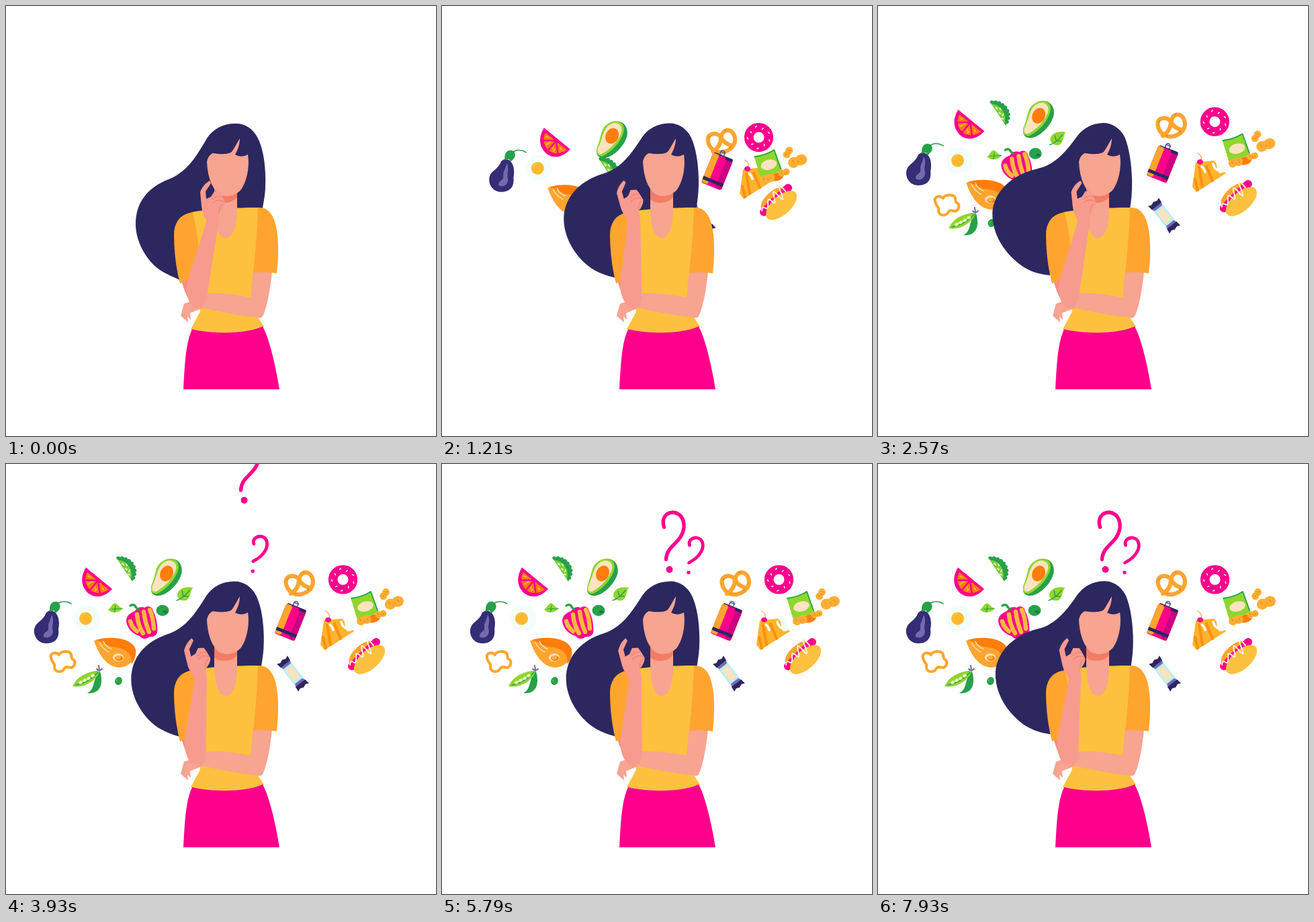
Animation of 640x640 px, one loop 8000 ms. Source, as an HTML page:

```html
<!DOCTYPE html>
<html lang="en">
<head>
<meta charset="utf-8">
<title>Food choices</title>
<style>
html, body { margin: 0; width: 100%; height: 100%; overflow: hidden; background: #fff; }
svg { display: block; width: 100%; height: 100%; }
</style>
</head>
<body>
<svg id="stage" viewBox="0 0 640 640"></svg>
<script>
const PINK = '#ff008c', NAVY = '#2d2760', PURPLE = '#7569b0', ORANGE = '#ffa52f', DEEP = '#ff7d0b',
  YELLOW = '#fcc13f', GREEN = '#27a14a', LIME = '#8fd62f', CREAM = '#fde3c0', WHITE = '#fff',
  SKIN = '#f7a491', ARM = '#f79b8e', SHADE = '#f27c66';

const shape = (fill, d) => `<path fill="${fill}" d="${d}"/>`;
const line = (color, width, d, extra = '') =>
  `<path fill="none" stroke="${color}" stroke-width="${width}" stroke-linecap="round" stroke-linejoin="round" d="${d}" ${extra}/>`;
const oval = (fill, x, y, rx, ry = rx, turn = 0) =>
  `<ellipse fill="${fill}" cx="${x}" cy="${y}" rx="${rx}" ry="${ry}" transform="rotate(${turn} ${x} ${y})"/>`;
const box = (fill, x, y, w, h, r = 0) =>
  `<rect fill="${fill}" x="${x}" y="${y}" width="${w}" height="${h}" rx="${r}"/>`;
const turned = (x, y, angle, content) => `<g transform="translate(${x} ${y}) rotate(${angle})">${content}</g>`;
const repeat = (n, f) => Array.from({ length: n }, (_, i) => f(i)).join('');

// Two overlapping lobes with small dents
const nut = (x, y, rx, ry, turn) => turned(x, y, turn,
  oval('#ffae35', -rx * .42, 0, rx * .58, ry) + oval('#ffae35', rx * .38, -1, rx * .62, ry) +
  line('#ee8a1c', 1.2, `M${-rx * .5} ${-ry * .4}l1 3M0 ${-ry * .1}l1 3M${rx * .4} ${-ry * .4}l1 3`));

// Each food: resting centre, start of its flight in ms, drawing at rest
const foods = [
  { x: 62, y: 236, start: 105, art:
    shape('#352d75', 'M65 218C77 218 81 232 78 246C80 261 71 267 60 267C48 267 41 257 42 247C44 234 54 236 60 221Z') +
    shape(PURPLE, 'M68 224C73 234 67 241 70 248C70 257 62 261 56 257C55 249 64 251 63 243C62 237 67 232 68 224') +
    shape(GREEN, 'M65 214C66 206 72 203 78 206C82 210 81 215 78 218L74 222L71 218L65 220Z') +
    line(GREEN, 1.6, 'M78 207Q87 202 97 208') },
  { x: 135, y: 177, start: 319, art:
    shape(PINK, 'M119 154L158 186C147 199 130 201 120 190C111 180 111 167 119 154Z') +
    shape(DEEP, 'M121 161L153 187C143 194 131 194 124 186C117 178 117 169 121 161Z') +
    line(PINK, 2.5, 'M137 173L116 173M137 173L124 189M137 173L140 196') +
    line(YELLOW, 1.5, 'M122 167l3 1M122 179l4-2M132 186l1-3M133 189l2-3M145 187l-2-3M127 176l2-1') },
  { x: 119, y: 230, start: 142, art:
    shape('#f3fdfc', 'M104 222C104 211 115 209 122 211C132 208 140 218 139 228C144 239 133 249 124 247C113 252 103 245 103 237C99 232 100 226 104 222Z') +
    oval('#fcb92f', 118.5, 230, 9.5) + line('#fcc955', 1.5, 'M112 228Q114 223 118 223') },
  { x: 162, y: 280, start: 296, art:
    shape(ORANGE, 'M131 263C150 257 185 258 193 277C195 292 180 303 168 303C150 302 138 284 131 263Z') +
    shape(DEEP, 'M133 262C152 256 187 257 193 276C194 284 192 292 186 298C190 284 178 274 164 273C150 272 145 264 133 262Z') +
    line(CREAM, 1.4, 'M145 264Q148 272 157 275M139 266Q144 275 153 280') +
    oval(CREAM, 167, 288, 8, 6) + oval(DEEP, 168, 289, 6, 4) + oval('#ffb24a', 167, 288, 4, 3) },
  { x: 84, y: 294, start: 1320, art:
    line(ORANGE, 4.1, 'M67 289C65 281 74 279 79 284C80 278 96 277 97 284C98 289 97 290 100 291C104 293 103 303 96 303C91 303 90 300 87 304C84 311 72 311 72 302C74 297 69 297 67 289Z') },
  { x: 121, y: 322, start: 1003, art:
    shape(GREEN, 'M139 306C145 322 144 343 121 341C133 335 128 324 139 306Z') +
    shape(LIME, 'M99 331C106 315 122 309 140 307C136 321 118 334 99 331Z') +
    line(GREEN, 1.5, 'M104 329Q124 325 137 310') +
    [[111, 325], [117, 322], [123, 319], [129, 315]].map(p => oval('#f1f6c0', ...p, 3, 2.3, -25)).join('') +
    line(PURPLE, 2, 'M139 307L138 300M135 305Q139 309 143 305') },
  { x: 167, y: 323, start: 680, art: oval(GREEN, 167.5, 323, 5.3, 6, 20) + line(LIME, 1, 'M165 323l1-2') },
  { x: 179, y: 156, start: 835, art:
    shape(GREEN, 'M164 139C181 136 196 149 192 165L188 175Z') +
    line(GREEN, 5, 'M167 140C180 138 191 148 192 159C192 166 190 170 188 172', 'stroke-dasharray=".1 5.6"') +
    shape('#7ecf35', 'M167 143C178 143 190 155 186 172Z') +
    line('#e8f6c4', 2, 'M173 148l2 2M179 149l1 2M178 156l2 1M184 158l-1 2M182 164l2 1') },
  { x: 239, y: 169, start: 344, art:
    shape(GREEN, 'M247 141C259 142 265 154 260 167C253 184 236 197 225 196C216 195 214 188 218 178C222 169 222 154 230 147Z') +
    shape(LIME, 'M247 141C256 143 259 150 255 161C249 176 236 188 225 193C217 194 214 188 217 179C222 169 222 154 230 147C236 142 241 140 247 141Z') +
    shape(CREAM, 'M246 144C253 146 255 152 252 160C246 173 235 184 223 190C217 191 216 185 219 179C224 169 225 156 232 149C236 145 241 143 246 144Z') +
    oval(DEEP, 239, 163, 9.5, 12, 25) },
  { x: 202, y: 235, start: 1074, art:
    shape(PINK, 'M179 234C179 225 186 221 192 219C195 213 203 212 206 214C211 210 218 212 219 219C225 230 226 244 225 251C222 258 217 257 214 257C208 262 201 260 199 256C190 254 180 245 179 234Z') +
    line('#fdb83e', 6.5, 'M185 234Q187 243 195 249M195 224Q196 239 204 252M205 220Q207 236 213 250M214 217Q219 228 220 245') +
    line(GREEN, 3.4, 'M197 216Q193 214 192 211Q189 208 185 211') },
  { x: 233, y: 218, start: 800, art: oval(GREEN, 233, 218, 9.5, 8.3) + oval('#157a3b', 237, 220, 3, 2) },
  { x: 265, y: 193, start: 982, art:
    shape(LIME, 'M278 184C265 181 255 187 255 196C257 203 266 205 270 202C275 197 274 190 278 184Z') +
    line(GREEN, 1.4, 'M254 203Q264 200 273 188M264 197l-2-8M264 197l7 0') },
  { x: 163, y: 215, start: 1272, art:
    shape(LIME, 'M152 217C157 213 157 208 163 207C167 210 169 214 174 215C167 222 159 223 152 217Z') +
    line(GREEN, 1.2, 'M157 216L173 215M162 216l1-5M163 216l-2 4') },
  { x: 437, y: 178, start: 257, art: turned(437, 178, -8,
    line(ORANGE, 6.2, 'M0 -6C-4 -15 -20 -16 -20 -4C-20 8 -12 16 0 16C13 15 22 6 20 -5C18 -18 4 -19 0 -6C-2 5 -8 10 -15 13M0 -6C3 3 10 7 16 9') +
    line('#d97a12', 1.2, 'M-18 -8l2-2M7 -15l2-1M-10 13l2 1M10 12l2-2')) },
  { x: 501, y: 172, start: 240, art:
    `<circle cx="501.5" cy="172" r="14.8" fill="none" stroke="${PINK}" stroke-width="13.6"/>` +
    repeat(9, i => turned(501.5, 172, i * 40 + 12, line(WHITE, 1.5, i % 2 ? 'M13 0l2 1' : 'M16 0l1 2'))) },
  { x: 423, y: 235, start: 135, art: turned(423, 235, 22,
    line('#55508c', 1.5, 'M-5 -25C-8 -34 3 -34 1 -25M-5 -29H2') +
    box(NAVY, -14, -25, 30, 10, 2) + box(PINK, -15.5, -23.5, 32, 48, 3) +
    box(ORANGE, -15.5, -23.5, 10, 47, 3) + box('#cc0082', 7, -22, 9.5, 46, 3) +
    box(NAVY, -15.5, 14, 32, 5) + box(NAVY, 5, -24.5, 11, 4, 1)) },
  { x: 490, y: 248, start: 186, art:
    shape('#ffb32e', 'M473 233L500 230L518 249L474 277L468 269Z') +
    line('#ff900f', 4, 'M478 240L483 269M489 238L498 260M472 258L476 274') +
    line(WHITE, 3.5, 'M482 239Q485 241 487 247M499 235Q501 242 505 244') +
    shape('#f3fdfc', 'M503 229Q517 232 517 246Q508 252 506 246Q504 238 503 229Z') +
    line(DEEP, 1, 'M481 230Q483 222 476 219') + oval(PINK, 479.5, 232, 4.6, 3.7) },
  { x: 537, y: 286, start: 243, art:
    oval(ORANGE, 530, 281, 24, 11, -41) +
    line(PINK, 12, 'M515 301L551 265') +
    oval(YELLOW, 541, 291, 28.5, 14, -42) +
    line('#fff0e0', 2, 'M512 299Q512 292 517 295T521 288T527 285T530 278T537 277T540 271T547 270') },
  { x: 534, y: 210, start: 385, art:
    shape(LIME, 'M513 199Q530 198 543 189L555 221L523 232Z') +
    line(GREEN, 1.8, 'M514 200Q530 198 543 190L553 218') +
    oval(CREAM, 535, 212, 12, 7.5, -14) +
    oval(DEEP, 547, 230, 10, 6, -15) + nut(533, 233, 11, 6.5, -8) + nut(558, 224, 8.5, 5, -8) +
    nut(564, 194, 9, 5.5, -50) + nut(578, 207, 14.5, 8, -15) },
  { x: 427, y: 312, start: 645, art: turned(427, 312, 52,
    box('#b4eff4', -18, -8.5, 36, 17) + box(CREAM, -11, -6, 22, 12, 1) +
    [0, 180].map(a => turned(0, 0, a, shape(PURPLE, 'M-14 -7L-19 -9V9L-14 7Z') +
      shape(NAVY, 'M-18 -9L-26 -10L-24 -5L-26 0L-24 5L-26 10L-18 9Z'))).join('')) }
];

const hairRight = 'M382 301C384 288 386 279 386 268C387 243 384 215 375 197C368 182 354 174 341 175C323 175 308 183 299 197C283 224 270 247 242 258C211 270 193 292 193 325C193 352 211 383 234 396C243 401 252 405 262 409L280 420L312 330Z';
const hairLeft = 'M375 301C377 290 378 277 378 264C378 243 375 214 367 195C360 181 347 174 335 174C317 175 306 182 297 193C282 213 266 236 237 242C200 250 170 277 170 310C170 345 195 376 221 391C232 397 244 400 260 401L280 420L312 330Z';

const woman =
  `<path id="hair" fill="${NAVY}"/>` +
  shape(YELLOW, 'M276 307C300 302 340 300 377 300L392 350L368 432L374 462L384 477C355 490 305 489 275 481L289 455L284 400Z') +
  shape(SKIN, 'M310 265V300C311 330 316 345 327 345C339 345 344 325 344 300V265Z') +
  shape(SHADE, 'M310 270V288C320 296 337 294 344 284V265Z') +
  shape(SKIN, 'M299 232C300 226 303 221 308 219C318 221 331 221 336 217C341 210 344 203 348 197C348 207 344 216 341 221C347 225 355 224 360 221C363 240 358 262 350 273C340 285 325 285 316 279C304 268 300 250 299 232Z') +
  shape(PINK, 'M277 481C305 488 355 489 382 477C393 497 402 540 407 570.5H264C266 530 268 500 277 481Z') +
  shape(SKIN, 'M368 394L396 395C393 425 388 450 382 462C380 465 375 464 370 463C345 460 315 455 288 448L296 428C325 427 345 430 364 434Z') +
  shape(ORANGE, 'M375 300C393 299 401 315 404 340C406 360 405 380 403 398C392 396 380 396 368 397C372 360 374 330 375 300Z') +
  shape(SKIN, 'M277 439L265 443L260 461L271 471L270 462L275 467L274 457L294 449Z') +
  shape('#f48e7f', 'M261 408L278 402L286 440L280 447C272 440 265 424 261 408Z') +
  shape(ORANGE, 'M278 307C260 309 250 322 250 340C250 365 253 390 259 413L271 407C280 385 287 368 286 352C284 335 281 320 278 307Z') +
  '<g id="forearm">' +
  shape(ARM, 'M299 317C292 344 281 374 271 406C267 422 269 436 276 445C281 452 290 452 295 444C299 436 299 430 301 420L317 318Z') +
  shape(ARM, 'M303 260C296 264 291 271 289 277L291 298C292 308 296 314 299 321L316 324L317 308C322 304 326 298 326 293L322 283L319 277L310 276L305 284L298 287L297 276L305 264Z') +
  line(SHADE, 1, 'M307 288Q313 281 321 284M308 293Q315 286 324 291M317 308Q317 299 322 295') +
  '</g>';

const marks =
  `<g id="bigMark">${line(PINK, 5.4, 'M330.5 94C326 80 334 72 344 72C356 73 361 84 360 95C357 118 334 121 333.5 142')}${oval(PINK, 338.5, 157, 5)}</g>` +
  `<g id="smallMark">${line(PINK, 4.8, 'M368.5 121C366 112 375 109 380 110C389 112 390 122 386 130C382 138 375 143 367.5 147')}${oval(PINK, 367, 161.5, 2.7)}</g>`;

const stage = document.getElementById('stage');
stage.innerHTML = foods.map(f => `<g class="food">${f.art}</g>`).join('') + woman + marks;
const foodNodes = stage.querySelectorAll('.food');
const [hair, forearm, bigMark, smallMark] =
  ['hair', 'forearm', 'bigMark', 'smallMark'].map(id => document.getElementById(id));

const LOOP = 8000, FPS = 14, HOME = { x: 310, y: 322 };
const swing = (t, period) => (1 + Math.cos(2 * Math.PI * t / period)) / 2;
const remaining = (t, start, duration) => (1 - Math.min(1, Math.max(0, (t - start) / duration))) ** 5;
const move = (node, x, y) => node.setAttribute('transform', `translate(${x} ${y})`);

const leftNumbers = hairLeft.match(/\d+/g).map(Number);
function hairPath(k) {
  let i = 0;
  return hairRight.replace(/\d+/g, n => {
    const from = leftNumbers[i++];
    return (from + (n - from) * k).toFixed(2);
  });
}

function draw(t) {
  foods.forEach((f, i) => {
    const r = remaining(t, f.start, 3150);
    move(foodNodes[i], (HOME.x - f.x) * r, (HOME.y - f.y) * r);
  });
  hair.setAttribute('d', hairPath(swing(t, 4800)));
  forearm.setAttribute('transform', `rotate(${-10.2 * (1 - swing(t, 2400))} 284 440)`);
  [[smallMark, 3460], [bigMark, 3855]].forEach(([node, start]) => {
    const r = remaining(t, start, 800);
    move(node, 26 * r, -167 * r);
  });
}

function tick() {
  const frame = Math.floor(((performance.now() % LOOP) + 6) * FPS / 1000);
  draw((frame * 1000 / FPS) % LOOP);
  requestAnimationFrame(tick);
}
tick();
</script>
</body>
</html>
```
